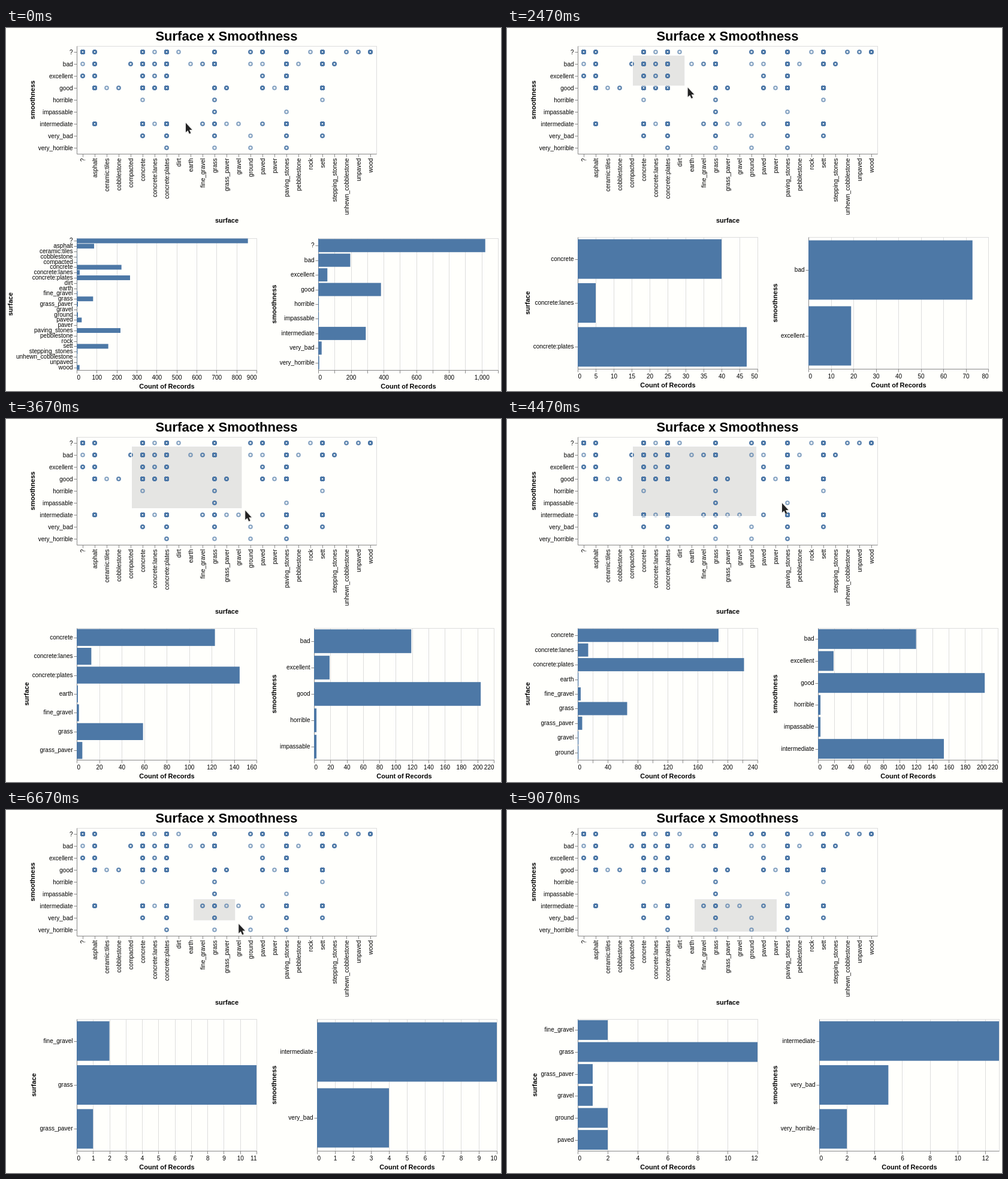
These frames come from a looping animation (826 px wide and 606 px high, 9.27 s). An HTML page with a canvas:

```html
<!DOCTYPE html>
<html lang="en">
<head>
<meta charset="utf-8">
<title>Surface x Smoothness</title>
<style>
  html, body { margin: 0; width: 100%; height: 100%; overflow: hidden; background: #fffffc; }
  canvas { display: block; }
</style>
</head>
<body>
<canvas id="stage" width="826" height="606"></canvas>
<script>
const ctx = document.getElementById('stage').getContext('2d');
const LOOP = 9270, BLUE = '#4d78a6', GRID = '#ddd', AXIS = '#888';
const FAMILY = '"Liberation Sans", Arial, sans-serif';
const LABEL = '10px ' + FAMILY, TITLE = 'bold 11px ' + FAMILY;

const grades = ['?', 'bad', 'excellent', 'good', 'horrible', 'impassable',
  'intermediate', 'very_bad', 'very_horrible'];
const KEYS = '?beghmivw'; // one letter per grade
const SHARE = { b: .143, e: .034, g: .366, h: .005, m: .005, i: .29, v: .02, w: .008 };

// 'b2i' is two bad records and one intermediate
function listed(spec) {
  const counts = grades.map(() => 0);
  for (const [, key, n] of spec.matchAll(/(\D)(\d*)/g)) counts[KEYS.indexOf(key)] = +n || 1;
  return counts;
}

// a common surface: every letter adds that grade's usual share, the rest is unrated
function mixed(total, keys) {
  const counts = grades.map(() => 0);
  counts[0] = total;
  for (const key of keys) {
    const n = Math.max(1, Math.round(total * SHARE[key]));
    counts[KEYS.indexOf(key)] += n;
    counts[0] -= n;
  }
  return counts;
}

const records = {
  '?': listed('?852be4'),
  'asphalt': mixed(87, 'beeegi'),
  'ceramic:tiles': listed('g'),
  'cobblestone': listed('g2'),
  'compacted': listed('b3'),
  'concrete': mixed(224, 'beghiv'),
  'concrete:lanes': listed('?b3e2g8i'),
  'concrete:plates': mixed(267, 'begivw'),
  'dirt': listed('?'),
  'earth': listed('b'),
  'fine_gravel': listed('b2i2'),
  'grass': listed('?11b43g11h2m3i7v4w'),
  'grass_paver': listed('g5i'),
  'gravel': listed('i'),
  'ground': listed('?3bvw'),
  'paved': listed('?13be3g6i2'),
  'paver': listed('g'),
  'paving_stones': mixed(219, 'beeegmivw'),
  'pebblestone': listed('b'),
  'rock': listed('?'),
  'sett': mixed(158, 'bghiv'),
  'stepping_stones': listed('b4'),
  'unhewn_cobblestone': listed('?2'),
  'unpaved': listed('?2'),
  'wood': listed('?14')
};
const surfaces = Object.keys(records);
const dots = surfaces.flatMap((surface, i) => records[surface].map((n, j) =>
  ({ surface, grade: grades[j], n, x: 128 + 20 * i, y: 40 + 20 * j }))).filter(d => d.n);

// pointer key points: tick (1/15 s), x, y
const path = [
  [0, 300, 158], [8, 300, 158], [14, 211, 50], [16, 209, 45], [17, 231, 62],
  [36, 296.5, 96.5], [45, 343.4, 120], [58, 416, 162], [65, 416, 162], [67, 459, 140],
  [71, 459, 140], [80, 340, 136], [84, 335, 136], [90, 322, 157], [91, 312, 148],
  [93, 330, 163], [99, 382.5, 184.5], [102, 400, 200], [113, 450, 203], [128, 450, 203],
  [129, 439, 198], [132, 439, 198], [134, 71, 16]
];
const drags = [{ from: 17, release: 65, clear: 69 }, { from: 92, release: 117, clear: 139 }];

function pointer(k) {
  const i = path.findIndex(p => p[0] > k);
  if (i < 0) return path[path.length - 1].slice(1);
  const [a, ax, ay] = path[i - 1], [b, bx, by] = path[i], f = (k - a) / (b - a);
  return [ax + (bx - ax) * f, ay + (by - ay) * f];
}

// the brush trails the pointer by one tick
function brushAt(k) {
  const drag = drags.find(d => k >= d.from && k < d.clear);
  if (!drag) return null;
  const [x, y] = pointer(drag.from - 1), [x2, y2] = pointer(Math.min(k - 1, drag.release));
  return { x, y, x2, y2, w: x2 - x, h: y2 - y };
}

function text(str, x, y, align = 'center', font = LABEL, turned = false) {
  ctx.save();
  ctx.translate(x, y);
  if (turned) ctx.rotate(-Math.PI / 2);
  ctx.font = font;
  ctx.textAlign = align;
  ctx.fillStyle = '#000';
  ctx.fillText(str, 0, 0);
  ctx.restore();
}

function width(str) {
  ctx.font = LABEL;
  return ctx.measureText(str).width;
}

const widest = names => Math.max(0, ...names.map(width));

function line(x1, y1, x2, y2, color) {
  ctx.strokeStyle = color;
  ctx.lineWidth = 1;
  ctx.beginPath();
  ctx.moveTo(x1 + .5, y1 + .5);
  ctx.lineTo(x2 + .5, y2 + .5);
  ctx.stroke();
}

function frame(x, y, w, h, color) {
  ctx.strokeStyle = color;
  ctx.lineWidth = 1;
  ctx.strokeRect(x + .5, y + .5, w, h);
}

function leftAxis(names, x, y, h, title, drop) {
  const step = h / names.length;
  names.forEach((name, i) => {
    const cy = y + step * (i + .5);
    line(x - 5, Math.round(cy), x, Math.round(cy), AXIS);
    text(name, x - 6.5, Math.round(cy + drop), 'right');
  });
  line(x, y, x, y + h, AXIS);
  text(title, x - 12.5 - widest(names), y + h / 2, 'center', TITLE, true);
}

function niceStep(max, count) {
  const raw = max / count, power = 10 ** Math.floor(Math.log10(raw)), e = raw / power;
  return power * (e >= Math.sqrt(50) ? 10 : e >= Math.sqrt(10) ? 5 : e >= Math.sqrt(2) ? 2 : 1);
}

function ticksFor(max) {
  if (!max) return { top: 1, ticks: [{ at: 0, label: '0' }] };
  const nice = niceStep(max, 10), top = Math.ceil(max / nice - 1e-9) * nice;
  const step = niceStep(top, 8), ticks = [];
  for (let i = 0; i * step <= top + 1e-9; i++) {
    const label = step < 1 ? (i * step).toFixed(1) : (i * step).toLocaleString('en-US');
    ticks.push({ at: i * step / top * 300, label });
  }
  return { top, ticks };
}

// end labels sit flush with the plot; every second one is dropped while any overlap
function placeLabels(ticks) {
  let labels = ticks.map(({ at, label }) => {
    const w = width(label);
    return { label, w, left: at < 1 ? 0 : at > 299 ? 300 - w : at - w / 2 };
  });
  while (labels.some((l, i) => i && labels[i - 1].left + labels[i - 1].w > l.left))
    labels = labels.filter((l, i) => i % 2 === 0);
  return labels;
}

function barChart(names, totals, x, y, title) {
  const h = 220, step = h / names.length;
  const { top, ticks } = ticksFor(Math.max(0, ...names.map(n => totals[n])));
  frame(x, y, 300, h, GRID);
  for (const { at } of ticks) {
    const tx = x + Math.round(at);
    line(tx, y, tx, y + h, GRID);
    line(tx, y + h, tx, y + h + 5, AXIS);
  }
  line(x, y + h, x + 300, y + h, AXIS);
  for (const { label, left } of placeLabels(ticks))
    text(label, x + .5 + left, y + h + 16, 'left');
  text('Count of Records', x + 150.5, y + h + 31, 'center', TITLE);
  leftAxis(names, x, y, h, title, 3);
  ctx.fillStyle = BLUE;
  names.forEach((name, i) =>
    ctx.fillRect(x, y + step * (i + .05), totals[name] / top * 300, step * .9));
}

function scatter(brush) {
  text('Surface x Smoothness', 368, 21, 'center', 'bold 22px ' + FAMILY);
  frame(118, 30, 500, 180, GRID);
  leftAxis(grades, 118, 30, 180, 'smoothness', 4);
  line(118, 210, 618, 210, AXIS);
  surfaces.forEach((name, i) => {
    const x = 128 + 20 * i;
    line(x, 210, x, 215, AXIS);
    text(name, x + 3.5, 217.5, 'right', LABEL, true);
  });
  text('surface', 368.5, 325, 'center', TITLE);

  if (brush) {
    ctx.fillStyle = 'rgba(51, 51, 51, .125)';
    ctx.fillRect(brush.x, brush.y, brush.w, brush.h);
  }
  ctx.strokeStyle = BLUE;
  ctx.lineWidth = 2;
  ctx.globalAlpha = .7;
  for (const d of dots) {
    // overlapping records darken the ring
    for (let i = Math.min(d.n, 60); i > 0; i--) {
      ctx.beginPath();
      ctx.arc(d.x, d.y, Math.sqrt(30) / 2, 0, 2 * Math.PI);
      ctx.stroke();
    }
  }
  ctx.globalAlpha = 1;
  if (brush) frame(brush.x, brush.y, brush.w, brush.h, '#fff');
}

function arrow(x, y) {
  ctx.save();
  ctx.translate(x, y + .5);
  const shape = new Path2D('M0 0V15.5L3.5 12.4 5.9 18 8.4 17 6 11.4H10.6Z');
  ctx.lineJoin = 'round';
  ctx.lineWidth = 1;
  ctx.strokeStyle = '#fff';
  ctx.shadowColor = 'rgba(0, 0, 0, .3)';
  ctx.shadowBlur = 2;
  ctx.stroke(shape);
  ctx.shadowColor = 'transparent';
  ctx.fillStyle = '#222';
  ctx.fill(shape);
  ctx.restore();
}

function draw(k) {
  const brush = brushAt(k), bySurface = {}, byGrade = {};
  for (const d of dots) {
    if (brush && (d.x < brush.x || d.x > brush.x2 || d.y < brush.y || d.y > brush.y2)) continue;
    bySurface[d.surface] = (bySurface[d.surface] || 0) + d.n;
    byGrade[d.grade] = (byGrade[d.grade] || 0) + d.n;
  }
  const left = surfaces.filter(s => bySurface[s]), right = grades.filter(g => byGrade[g]);
  const y = left.length > 18 ? 351 : 349; // crowded labels push the plots down

  ctx.fillStyle = '#fffffc';
  ctx.fillRect(0, 0, 826, 606);
  scatter(brush);
  barChart(left, bySurface, 118, y, 'surface');
  barChart(right, byGrade, Math.round(463.6 + widest(right)), y, 'smoothness');
  if (k < 132 || (k >= 134 && k < 136)) arrow(...pointer(k));
}

let shown = -1;
function loop() {
  const k = Math.floor(performance.now() % LOOP * .015 + .1);
  if (k !== shown) draw(shown = k);
  requestAnimationFrame(loop);
}
loop();
</script>
</body>
</html>
```
